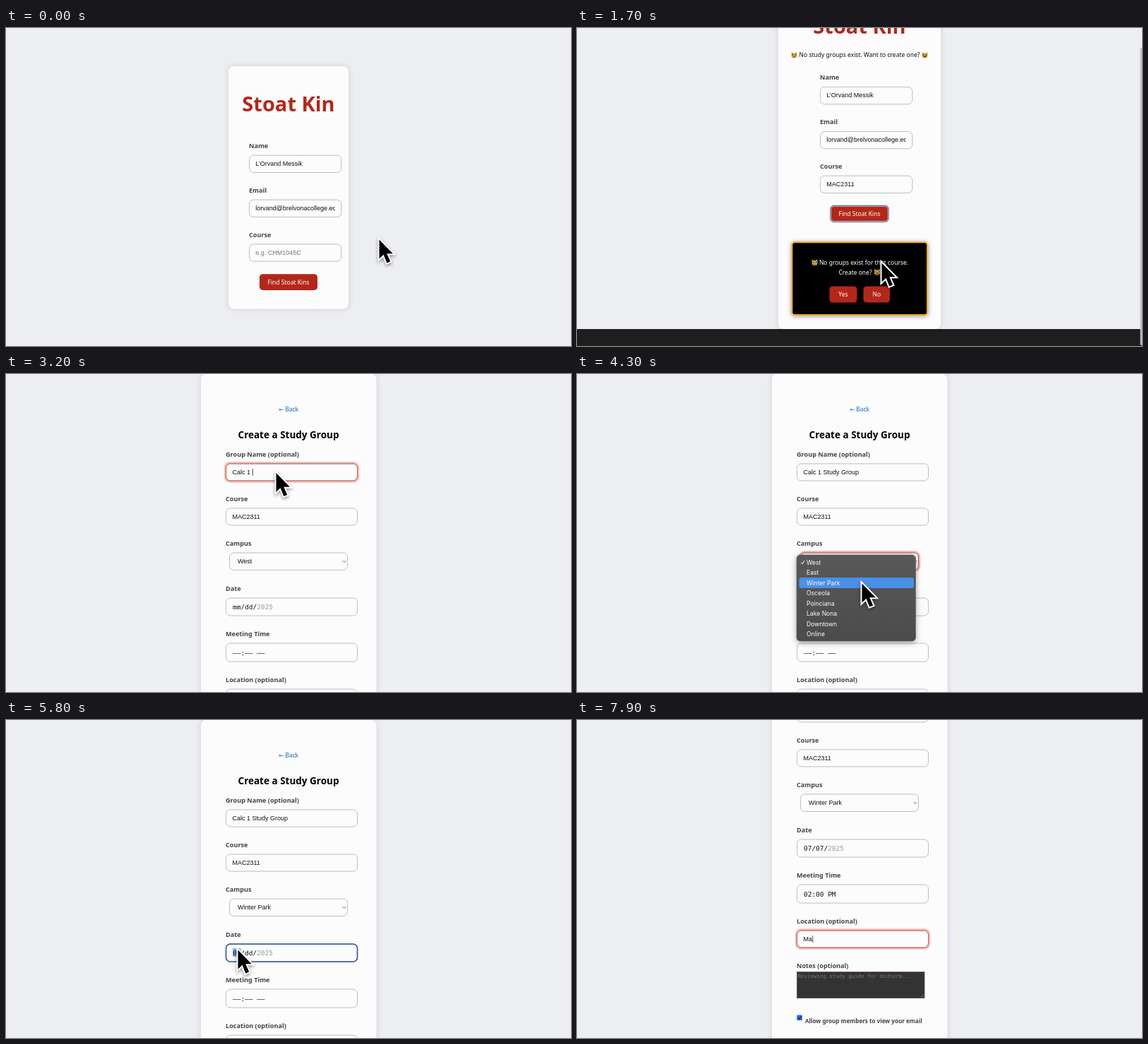
An HTML page for the animation above (8 s loop, 800 by 450 pixels).

```html
<!DOCTYPE html>
<html lang="en">
<head>
<meta charset="utf-8">
<title>Study group form</title>
<style>
  html, body { margin: 0; width: 100%; height: 100%; overflow: hidden; background: #edeef2; }
  svg { display: block; }
  text { font-family: "Noto Sans", "Open Sans", sans-serif; white-space: pre; }
  .label { font-weight: 700; font-size: 9.1px; fill: #444; }
  .body { font-size: 8.5px; }
  .input { font: 9px "Liberation Sans", Arial, sans-serif; }
  .mono { font: 9.45px "DejaVu Sans Mono", monospace; }
  .menu { font: 8.6px Inter, Roboto, sans-serif; fill: #fff; }
  .title { font-weight: 700; font-size: 29px; fill: #b3281b; }
  .arrow { font-family: "DejaVu Sans", sans-serif; }
  .mid { text-anchor: middle; }
  .card { fill: #fcfcfc; filter: drop-shadow(0 0 4px rgba(0,0,0,.12)); }
  .field { fill: #fcfcfc; stroke: #c0c0c0; filter: drop-shadow(0 .5px .5px rgba(0,0,0,.08)); }
  .dialog { stroke: #f9aa20; stroke-width: 2; filter: drop-shadow(0 1px 3px rgba(0,0,0,.4)); }
  .cursor { filter: drop-shadow(0 2px 2px rgba(0,0,0,.4)); }
</style>
</head>
<body>
<svg id="stage" width="800" height="450" viewBox="0 0 800 450"></svg>
<script>
const LOOP = 8000, STEP = 100;
const RED = '#b32719', AMBER = '#fbac18';
const stage = document.getElementById('stage');

const DEFS = `<defs>
  <clipPath id="mail"><rect x="353" y="-500" width="113" height="1500"/></clipPath>
  <linearGradient id="grey" x2="0" y2="1"><stop stop-color="#595959"/><stop offset="1" stop-color="#4b4b4b"/></linearGradient>
  <g id="cat"><path d="M-4 1L-3.8-4.2L-1.3-2.8H1.3L3.8-4.2L4 1A4 3.3 0 0 1-4 1Z" fill="#d3a545"/>
    <path d="M-2.1-1.4V.4M2.1-1.4V.4" stroke="#4a3410" stroke-width="1.3"/></g>
  <g id="sad"><use href="#cat"/><path d="M-1.2 3Q0 1.6 1.2 3" fill="none" stroke="#4a3410"/>
    <circle cx="-2.4" cy="2" r="1" fill="#7fa9b8"/></g>
  <g id="glad"><use href="#cat"/><path d="M-2.4 1.1H2.4Q0 5.4-2.4 1.1Z" fill="#5b2b14"/></g>
</defs>`;

const ease = p => p * p * (3 - 2 * p);

// Eased interpolation through [time, value, value...] keys
function track(keys, t) {
  let i = keys.findIndex(k => k[0] > t);
  if (i === 0) return keys[0].slice(1);
  if (i < 0) return keys[keys.length - 1].slice(1);
  const a = keys[i - 1], b = keys[i], p = ease((t - a[0]) / (b[0] - a[0]));
  return a.slice(1).map((v, j) => v + (b[j + 1] - v) * p);
}

const pointerKeys = [
  [0, 527, 296.5], [400, 430, 329.5], [1800, 430, 329.5], [2200, 369, 390.5], [2600, 369, 390.5],
  [2900, 381, 137], [3600, 381, 137], [3900, 399, 264], [4000, 399, 264], [4300, 402, 293.5],
  [4900, 402, 293.5], [5500, 327, 322.5], [6300, 327, 322.5], [6700, 322, 295.5], [7200, 322, 295.5], [7600, 340, 306]
];
const searchScroll = [[1200, 30], [1600, -25], [1700, -26], [2200, 0]];
const formScroll = [[6300, 0], [6700, -85.5], [7200, -85.5], [7600, -148]];

const text = (x, y, s, cls, fill = '#111', extra = '') =>
  `<text x="${x}" y="${y}" class="${cls}" fill="${fill}" ${extra}>${s}</text>`;
const rect = (x, y, w, h, r, attrs) =>
  `<rect x="${x}" y="${y}" width="${w}" height="${h}" rx="${r}" ${attrs}/>`;
const use = (id, x, y) => `<use href="#${id}" x="${x}" y="${y}"/>`;
const label = (x, y, s) => text(x, y, s, 'label');
const shift = (y, s) => `<g transform="translate(0 ${y})">${s}</g>`;
const typed = (s, t, start, perStep) =>
  s.slice(0, Math.max(0, Math.floor((t - start) / STEP * perStep + 1e-6)));

function field(x, y, w, h, focus) {
  let s = '';
  if (focus === 'red') s += rect(x - 1, y - 1, w + 2, h + 2, 7, 'fill="none" stroke="#f3bcb5" stroke-width="2.4"');
  s += rect(x + .5, y + .5, w - 1, h - 1, 6, 'class="field"');
  if (focus) s += rect(x + .5, y + .5, w - 1, h - 1, 6,
    `fill="none" stroke="${focus === 'red' ? '#c85648' : '#2c568f'}" stroke-width="${focus === 'red' ? 1 : 1.6}"`);
  return s;
}

function entry(x, y, value, hint, focus) {
  const caret = focus ? '<tspan dx="-.5" font-size="10" fill="#333">|</tspan>' : '';
  return text(x, y, (value || (focus ? '' : hint)) + caret, 'input', value || focus ? '#111' : '#777');
}

const button = (x, y, w, h, s, hot) =>
  rect(x, y, w, h, 4.5, `fill="${hot ? AMBER : RED}"`) +
  text(x + w / 2, y + h / 2 + 3.2, s, 'body mid', hot ? '#222' : '#fff');

function searchRows(t) {
  const typing = t >= 400 && t < 1000;
  const course = typed('MAC2311', t, 400, 1.75);
  let s = label(344, 169.8, 'Name') + field(344, 179.7, 131.3, 25.3) + text(353.3, 195, 'L’Orvand Messik', 'input') +
    label(344, 232.8, 'Email') + field(344, 242.7, 131.3, 25.3) +
    text(353.3, 258, 'lorvand@brelvonacollege.edu', 'input', '#111', 'clip-path="url(#mail)"') +
    label(344, 295.8, 'Course') + field(344, 305.4, 131.3, 25.3, typing && 'red') +
    entry(353.3, 321, course, 'e.g. CHM1045C', typing) +
    button(359, 348.2, 82, 22.7, 'Find Stoat Kins');
  if (t >= 1000) s += rect(359.6, 348.8, 80.8, 21.5, 4.5, 'fill="none" stroke="#fff" stroke-width=".9"') +
    rect(358.8, 348, 82.4, 23.1, 5, 'fill="none" stroke="#2f5b98"');
  return s;
}

function searchPage(t) {
  if (t < 1100) return rect(315, 54, 170, 343.5, 8, 'class="card"') +
    text(400, 118, 'Stoat Kin', 'title mid') + searchRows(t);

  const y = track(searchScroll, t)[0], hot = t >= 2200;
  const page = rect(285, -30, 230, 482, 8, 'class="card"') +
    text(400, 34, 'Stoat Kin', 'title mid') +
    use('sad', 307.5, 64.3) + use('glad', 492.5, 64.3) +
    text(400, 67.2, 'No study groups exist. Want to create one?', 'body mid') +
    shift(-70.7, searchRows(t)) +
    rect(304.4, 329.2, 191.6, 102.8, 4, 'class="dialog"') +
    use('sad', 336.5, 357.8) + text(406, 361, 'No groups exist for that course.', 'body mid', '#fff') +
    text(394, 374.5, 'Create one?', 'body mid', '#fff') + use('glad', 425, 371.3) +
    (hot ? button(356.5, 391, 41, 23.5, 'Yes', true) : button(357.5, 391.5, 39, 23, 'Yes')) +
    button(405.5, 391.5, 37.5, 23, 'No');
  const over = y < -2 ? rect(0, 452 + y, 800, 60, 0, 'fill="#1e1e1e"') : '';
  const bar = t >= 1300 && t < 2100 ? rect(797.5, 28, 2.5, 421, 1.2, 'fill="#bdbdbf"') : '';
  return over + shift(y, page) + bar;
}

function menu(y) {
  const items = ['West', 'East', 'Winter Park', 'Osceola', 'Poinciana', 'Lake Nona', 'Downtown', 'Online'];
  const on = Math.max(0, Math.floor((y - 259) / 14.5));
  return rect(311, 256, 168.5, 122, 5, 'fill="url(#grey)" stroke="#666" stroke-width=".6" style="filter:drop-shadow(0 2px 4px rgba(0,0,0,.35))"') +
    rect(314.5, 259 + on * 14.55, 162.5, 14.8, 3, 'fill="#4b8fe8"') +
    '<path d="M317.3 266.6L319.1 268.9L322 263.8" fill="none" stroke="#fff"/>' +
    items.map((s, i) => text(325, 269.6 + i * 14.55, s, 'menu', '#fff')).join('');
}

// Date and time text in fixed-width parts, one of which may be selected
function parts(y, list, selected) {
  let x = 321;
  return list.map(([s, fill], i) => {
    const w = s.length * 5.69;
    const out = (i === selected ? rect(x, y - 10, w, 12, 0, 'fill="#83b6ee"') : '') + text(x, y, s, 'mono', fill);
    x += w;
    return out;
  }).join('');
}

function formPage(t, pointerY) {
  const naming = t >= 2900 && t < 3900, campus = t >= 3900 && t < 5600;
  const dating = t >= 5600 && t < 6700, timing = t >= 6700 && t < 7600, placing = t >= 7600;
  const month = t < 5800 ? 'mm' : t < 5900 ? '0 ' : '07';
  const day = t < 6000 ? 'dd' : t < 6100 ? '0 ' : '07';
  const hour = t < 6800 ? '––' : '02', minute = t < 6900 ? '––' : '00', half = t < 7200 ? '––' : 'PM';
  const dateSel = !dating ? -1 : t < 5900 ? 0 : t < 6200 ? 2 : -1;
  const timeSel = !timing ? -1 : t < 6800 ? 0 : t < 6900 ? 2 : 4;

  const page = rect(276, -1, 248.5, 720, 9, 'class="card"') +
    text(400, 53, '<tspan class="arrow">←</tspan> Back', 'body mid', '#1c62c8') +
    text(400, 90.5, 'Create a Study Group', 'mid', '#000', 'font-weight="700" font-size="13.5"') +
    label(311, 117, 'Group Name (optional)') + field(311, 126.5, 187, 25, naming && 'red') +
    entry(320.5, 142, typed('Calc 1 Study Group', t, 2900, 2.6), '', naming) +
    label(311, 179.5, 'Course') + field(311, 189.5, 187, 25) + entry(320.5, 205, 'MAC2311') +
    label(311, 242.5, 'Campus') + field(316, 252.5, 168, 25.5, campus && 'red') +
    text(328, 268.3, t < 4600 ? 'West' : 'Winter Park', 'input') +
    '<path d="M476.8 264.2L479 266.5L481.2 264.2" fill="none" stroke="#666"/>' +
    label(311, 306.5, 'Date') + field(311, 316.5, 187, 26, dating && 'blue') +
    parts(333, [[month], ['/'], [day], ['/'], ['2025', '#999']], dateSel) +
    label(311, 370.5, 'Meeting Time') + field(311, 380.5, 187, 27, timing && 'blue') +
    parts(397.5, [[hour], [':'], [minute], [' '], [half]], timeSel) +
    label(311, 435.5, 'Location (optional)') + field(311, 445.5, 187, 25, placing && 'red') +
    entry(320.5, 461, typed('Ma', t, 7700, 1), 'e.g. QNZ building, 2nd floor', placing) +
    label(311, 498.5, 'Notes (optional)') + rect(311.5, 504.5, 180.5, 37, 0, 'fill="#333" stroke="#555" stroke-width=".8"') +
    text(312.5, 512.8, 'Reviewing study guide for midterm...', 'mono', '#777', 'style="font-size:7.45px"') +
    '<path d="M486.5 540.5L490.5 536.5M489 540.5L490.5 539" stroke="#999" stroke-width=".6"/>' +
    rect(311.3, 565.5, 7.6, 7.6, 1.3, 'fill="#1f6fe0"') +
    '<path d="M313 569.4L314.6 571.2L317.3 567.3" fill="none" stroke="#222" stroke-width="1.1"/>' +
    text(323, 577, 'Allow group members to view your email', 'label', '#444', 'style="font-size:8.1px"');
  return shift(track(formScroll, t)[0], page) + (t >= 4000 && t < 4600 ? menu(pointerY) : '');
}

const pointer = (x, y) => `<path class="cursor" transform="translate(${x} ${y})"
  d="M1.5 3V30L7.5 24.2L12.3 36L17.2 34L12.3 22.8H20.8Z" stroke="#fff" stroke-width="4" paint-order="stroke"/>`;

function draw(t) {
  const [x, y] = track(pointerKeys, t);
  stage.innerHTML = DEFS + rect(0, 0, 800, 450, 0, 'fill="#edeef2"') +
    (t < 2600 ? searchPage(t) : formPage(t, y)) + (t < 7800 ? pointer(x, y) : '');
}

const start = performance.now();
let last = -1;
function tick() {
  const t = Math.floor((performance.now() - start) % LOOP / STEP) * STEP;
  if (t !== last) draw(last = t);
  requestAnimationFrame(tick);
}
tick();
</script>
</body>
</html>
```
